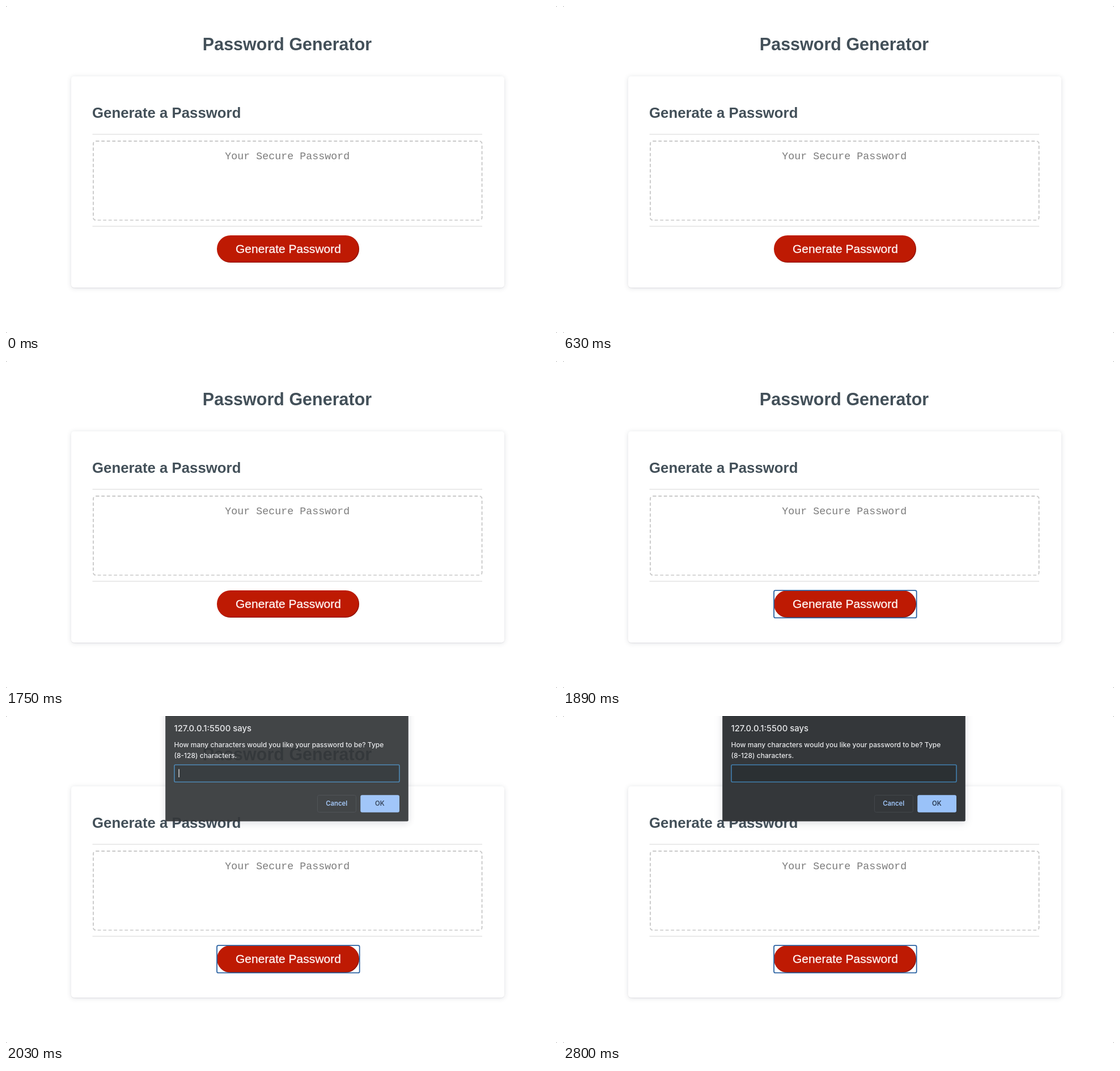
An HTML page for the animation above (3010 ms loop, 972 by 576 pixels).

```html
<!DOCTYPE html>
<html lang="en">
<head>
<meta charset="utf-8">
<title>Password Generator</title>
<style>
  html, body { margin: 0; width: 100%; height: 100%; overflow: hidden; background: #777; }
  .page { position: absolute; inset: 0; width: 972px; height: 576px; overflow: hidden; background: #fff; border-radius: 2px; }
  .page > * { position: absolute; box-sizing: border-box; }
  svg { left: 0; top: 0; width: 972px; height: 576px; }

  .card {
    left: 114.5px; top: 124px; width: 764px; height: 372px;
    border-radius: 5px; background: #fff;
    box-shadow: 0 1px 8px rgba(50, 56, 75, .15), 0 1px 1px rgba(50, 56, 75, .08);
  }
  .field {
    left: 152.6px; top: 236.5px; width: 720px; height: 148px;
    border: 2px dashed #c9c9c9; border-radius: 6px;
    transform: scale(.955); transform-origin: 0 0;
  }
  .button {
    left: 372.3px; top: 404.3px; width: 251px; height: 47.6px;
    border-radius: 24px; background: #be1a03;
    box-shadow: inset -1px -1px 1px rgba(60, 0, 0, .4);
  }

  text { font-family: "Liberation Sans", Arial, sans-serif; font-kerning: none; }
  .heading { font-weight: 700; fill: #435059; }
  .placeholder { font: 18.33px "Liberation Mono", "Courier New", monospace; fill: #7c7c7c; }
  .label { font-size: 21.05px; fill: #fff5f3; stroke: #fff5f3; stroke-width: .3px; }
  .mid { text-anchor: middle; }

  .dialog text { font-family: Inter, sans-serif; font-kerning: auto; font-weight: 500; fill: #e8e9eb; font-size: 12.05px; }
  .dialog .origin { font-size: 14.9px; }
  .dialog .action { font-size: 11.3px; font-weight: 600; }
  .panel { fill: #34373a; filter: drop-shadow(0 3px 7px rgba(40, 44, 70, .16)); }

  .focus, .dialog, .caret { animation: 3010ms step-end infinite; }
  .focus { animation-name: focus; }
  .dialog { animation-name: open; transform-origin: 495.5px 185px; }
  .caret { animation-name: blink; }

  @keyframes focus {
    0% { opacity: 0; }
    62.791%, 100% { opacity: 1; }
  }
  /* The panel tilts in from the top edge while it fades up. */
  @keyframes open {
    0% { opacity: 0; transform: none; }
    65.116% {
      opacity: .386;
      transform: translateY(-7.5px) matrix3d(.995, 0, 0, 0, 0, 1.02, 0, -.00012, 0, 0, 1, 0, 0, 0, 0, 1);
    }
    67.442% { opacity: .93; transform: none; }
    69.767%, 100% { opacity: 1; transform: none; }
  }
  @keyframes blink {
    0% { opacity: 1; }
    81.395%, 100% { opacity: 0; }
  }
</style>
</head>
<body>
<div class="page">
  <div class="card"></div>
  <div class="field"></div>
  <div class="button"></div>

  <svg viewBox="0 0 972 576">
    <text class="heading mid" x="496" y="77.5" font-size="30.5">Password Generator</text>
    <text class="heading" x="152" y="197.3" font-size="25.8">Generate a Password</text>
    <path d="M152.5 226H840M152.5 388H840" stroke="#e4e4e4" stroke-width="1.4"/>
    <text class="placeholder mid" x="496.3" y="269.5">Your Secure Password</text>
    <text class="label mid" x="498" y="434.8">Generate Password</text>
    <rect class="focus" x="372.1" y="404.2" width="251.6" height="48.2" rx="2.5" fill="none" stroke="#2a62a2" stroke-width="1.8"/>
  </svg>

  <svg class="dialog" viewBox="0 0 972 576">
    <rect class="panel" x="281.2" y="-20" width="428.6" height="205.4" rx="2"/>
    <text class="origin" x="296.5" y="27.1">127.0.0.1:5500 says</text>
    <text x="296.5" y="54.6">How many characters would you like your password to be? Type</text>
    <text x="296.5" y="73.6">(8-128) characters.</text>
    <rect x="297" y="86" width="397" height="30.3" rx="2" fill="#2b3033" stroke="#417fae" stroke-width="1.6"/>
    <rect class="caret" x="304.5" y="93.5" width="1.2" height="14.5" fill="#f0f1f2"/>
    <rect x="549.5" y="139.5" width="68" height="30" rx="3" fill="none" stroke="#43474b"/>
    <text class="action mid" x="583.2" y="158.2" style="fill:#9fc5f8">Cancel</text>
    <rect x="625.3" y="139.2" width="68.7" height="30.6" rx="3" fill="#9ac2f9"/>
    <text class="action mid" x="659.3" y="158.2" style="fill:#2b3a52">OK</text>
  </svg>
</div>
</body>
</html>
```
